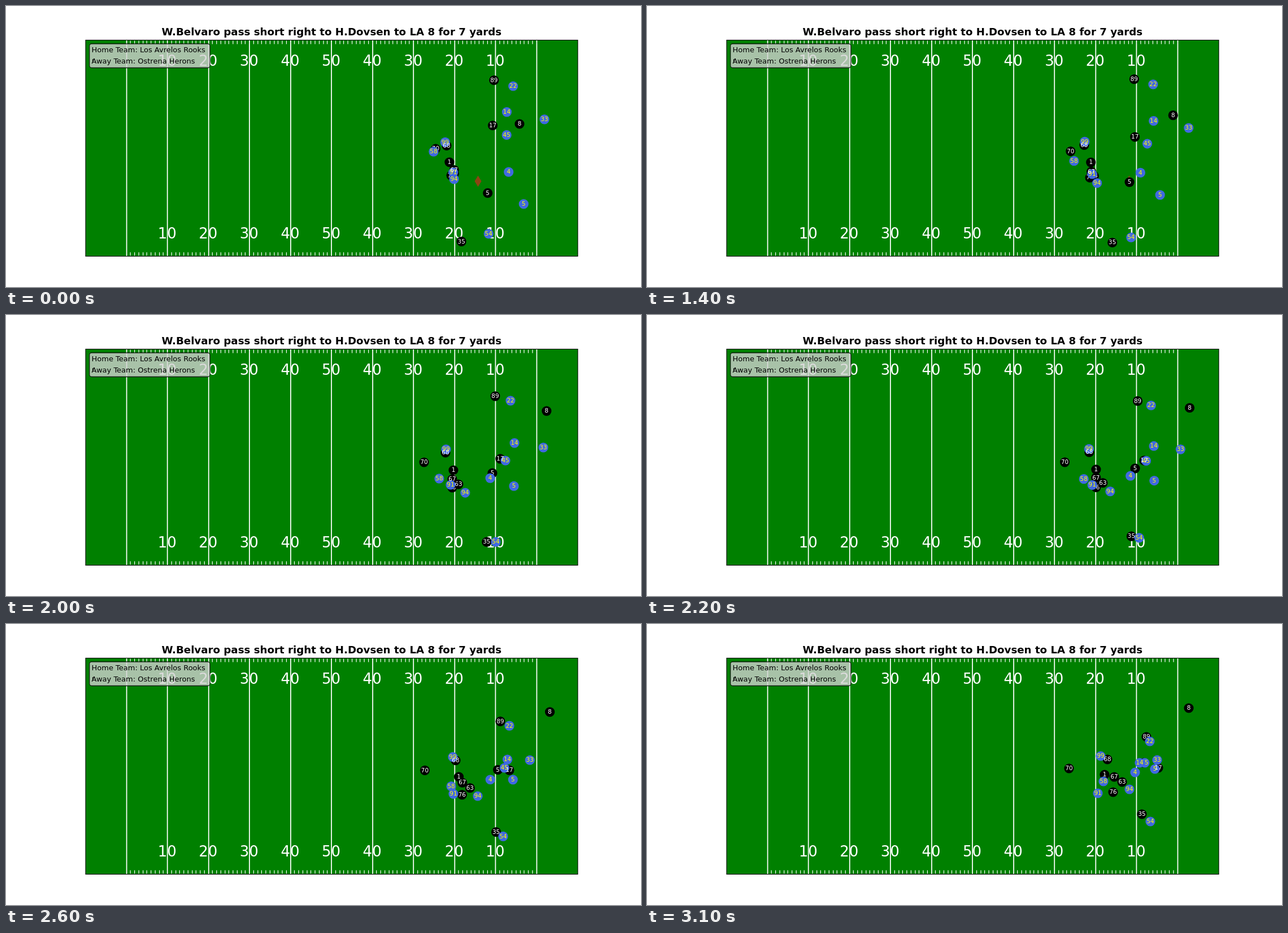
These frames come from a looping animation (1124x498 px, 3200 ms). An HTML page:

```html
<!DOCTYPE html>
<html lang="en">
<head>
<meta charset="utf-8">
<title>Play tracking</title>
<style>
  html, body { margin: 0; width: 100%; height: 100%; overflow: hidden; background: #fff; }
  svg { display: block; width: 1124px; height: 498px; font-family: "DejaVu Sans", sans-serif; }
  .mid { text-anchor: middle; }
</style>
</head>
<body>
<svg id="stage" viewBox="0 0 1124 498"></svg>
<script>
const NS = 'http://www.w3.org/2000/svg';
const stage = document.getElementById('stage');

function add(parent, tag, attrs, text) {
  const el = document.createElementNS(NS, tag);
  for (const k in attrs) el.setAttribute(k, attrs[k]);
  if (text !== undefined) el.textContent = text;
  return parent.appendChild(el);
}
const group = () => add(stage, 'g', {});
const label = (parent, x, y, size, text, more) =>
  add(parent, 'text', { x, y, 'font-size': size, ...more }, text);

// The chart is laid out 1200 wide at 100 dpi, then scaled to the stage.
const SCALE = 1124 / 1200;
const PT = 100 / 72 * SCALE;
const LEFT = 150 * SCALE, TOP = 64.5 * SCALE, BOTTOM = 473.5 * SCALE;
const YARD = 7.75 * SCALE;
const yardX = y => LEFT + y * YARD;
const snapX = y => Math.round(150 + y * 7.75) * SCALE;

function drawField() {
  const g = group();
  const box = { x: 150.5 * SCALE, y: TOP, width: 930 * SCALE, height: BOTTOM - TOP };
  add(g, 'rect', { ...box, fill: '#008000' });
  let lines = '', ticks = '';
  for (let y = 10; y <= 110; y++) {
    const x = snapX(y).toFixed(2);
    if (y % 10 === 0) lines += `M${x} ${TOP}V${BOTTOM}`;
    else ticks += `M${x} ${TOP + 1}v6M${x} ${BOTTOM - 1}v-6`;
  }
  add(g, 'path', { d: lines, stroke: '#fff', 'stroke-width': 1.75 });
  add(g, 'path', { d: ticks, stroke: '#fff', 'stroke-width': 1.2 });
  for (let y = 20; y <= 100; y += 10) {
    const yards = 50 - Math.abs(60 - y);
    for (const base of [106, 412])
      label(g, yardX(y) - 0.5, base, 20 * PT, yards, { fill: '#fff', class: 'mid' });
  }
  add(g, 'rect', { ...box, fill: 'none', stroke: '#000', 'stroke-width': 1.04 });
  label(g, 576.3, 52, 14 * PT, 'W.Belvaro pass short right to H.Dovsen to LA 8 for 7 yards',
    { class: 'mid', 'font-weight': 'bold' });
}

function roundBox(parent, x, y, width, height, rx, fill, alpha) {
  add(parent, 'rect', { x, y, width, height, rx, fill, stroke: '#000', 'stroke-width': PT,
    'fill-opacity': alpha, 'stroke-opacity': alpha });
}

function drawLegend() {
  const g = group();
  roundBox(g, 147.7, 67, 213.3, 42.5, 3.9, '#d3d3d3', 0.8);
  label(g, 151.6, 81.5, 10 * PT, 'Home Team: Los Avrelos Rooks');
  label(g, 151.6, 101.5, 10 * PT, 'Away Team: Ostrena Herons');
  add(g, 'path', { d: 'M153.5 94v5', stroke: '#000', 'stroke-width': 0.9 });
}

drawField();
drawLegend();
const ball = add(stage, 'path', { d: 'M0 -10L6 0L0 10L-6 0Z', fill: '#8b4513' });
const awayLayer = group(), homeLayer = group(), topLayer = group();
const players = [];

// Each run is a parabola through three points: at the pause, midway, at the end.
function player(layer, fill, ink, num, points, textLayer = layer) {
  const dot = add(layer, 'circle', { r: 8.6, fill });
  const text = label(textLayer, 0, 0, 8 * PT, num, { fill: ink, class: 'mid' });
  players.push({ dot, text, points });
}
const away = player.bind(null, awayLayer, '#000', '#fff');
const home = player.bind(null, homeLayer, '#4169e1', '#ff0');

away(89, [[863, 130], [866, 144], [884, 200]]);
away(8, [[918, 203], [957, 170], [959, 149]]);
away(17, [[862, 220], [875, 255], [905, 255]], topLayer);
away(70, [[756, 255], [740, 261], [747, 256]]);
away(68, [[777, 247], [778, 244], [815, 240]], topLayer);
away(1, [[785, 277], [792, 275], [810, 267]]);
away(76, [[786, 302], [790, 306], [825, 298]]);
away(63, [[792, 299], [801, 300], [841, 280]]);
away(67, [[790, 292], [790, 291], [827, 271]], topLayer);
away(5, [[853, 324], [861, 280], [879, 246]]);
away(35, [[813, 419], [851, 402], [876, 337]]);

home(22, [[897, 140], [893, 152], [890, 208]]);
home(45, [[886, 235], [884, 258], [881, 246]]);
home(14, [[891, 194], [900, 227], [872, 246]]);
home(33, [[956, 207], [951, 235], [903, 241]]);
home(99, [[776, 241], [779, 238], [803, 234]]);
home(58, [[756, 265], [767, 290], [808, 279]]);
home(4, [[883, 295], [857, 289], [864, 263]]);
home(91, [[790, 296], [787, 301], [798, 300]]);
home(94, [[794, 310], [813, 315], [854, 293]]);
home(5, [[913, 345], [899, 303], [899, 257]]);
home(54, [[855, 407], [867, 402], [891, 350]]);

function makeCallout() {
  const g = group();
  add(g, 'circle', { cx: 886, cy: 235, r: 11, fill: 'none', stroke: '#ff0', 'stroke-width': 2 * PT });
  add(g, 'path', { d: 'M946.5 137.5L888 233', stroke: '#000', 'stroke-width': PT });
  add(g, 'path', { d: 'M6.3 -3.2L0 0L6.3 3.2', fill: 'none', stroke: '#000', 'stroke-width': PT,
    transform: 'translate(888 233) rotate(-58.5)' });
  roundBox(g, 786.5, 104.3, 343, 31.8, 7.8, '#f5deb3', 0.5);
  label(g, 793.8, 125, 12 * PT, 'Denny Vamser: Tackle Probability: 25.61%');
  return g;
}
const callout = makeCallout();

const TICK = 100, LOOP = 3200;
const PAUSE = 3, RESUME = 14, LAST = 31;

// Distance along every run: 0 at the pause, 1 midway, 2 at the end.
function progress(n) {
  if (n < RESUME) return Math.min(0, (n - PAUSE) / 20);
  const s = (n - RESUME) / (LAST - RESUME);
  return 0.25 + 1.75 * (s + 0.32 * s * (1 - s));
}

const parabola = (a, b, c, p) => a + (b - a) * p + (a - 2 * b + c) * p * (p - 1) / 2;

function render(ms) {
  const n = Math.floor((ms % LOOP) / TICK);
  const p = progress(n);
  for (const { dot, text, points: [a, b, c] } of players) {
    const x = parabola(a[0], b[0], c[0], p), y = parabola(a[1], b[1], c[1], p);
    dot.setAttribute('cx', x);
    dot.setAttribute('cy', y);
    text.setAttribute('x', x);
    text.setAttribute('y', y + 3.2);
  }
  ball.setAttribute('transform', `translate(${842.3 + 45 * p} 310.5)`);
  ball.style.display = n <= RESUME ? '' : 'none';
  callout.style.display = n >= PAUSE && n < RESUME ? '' : 'none';
}

const start = performance.now();
function loop() {
  render(performance.now() - start);
  requestAnimationFrame(loop);
}
loop();
</script>
</body>
</html>
```
